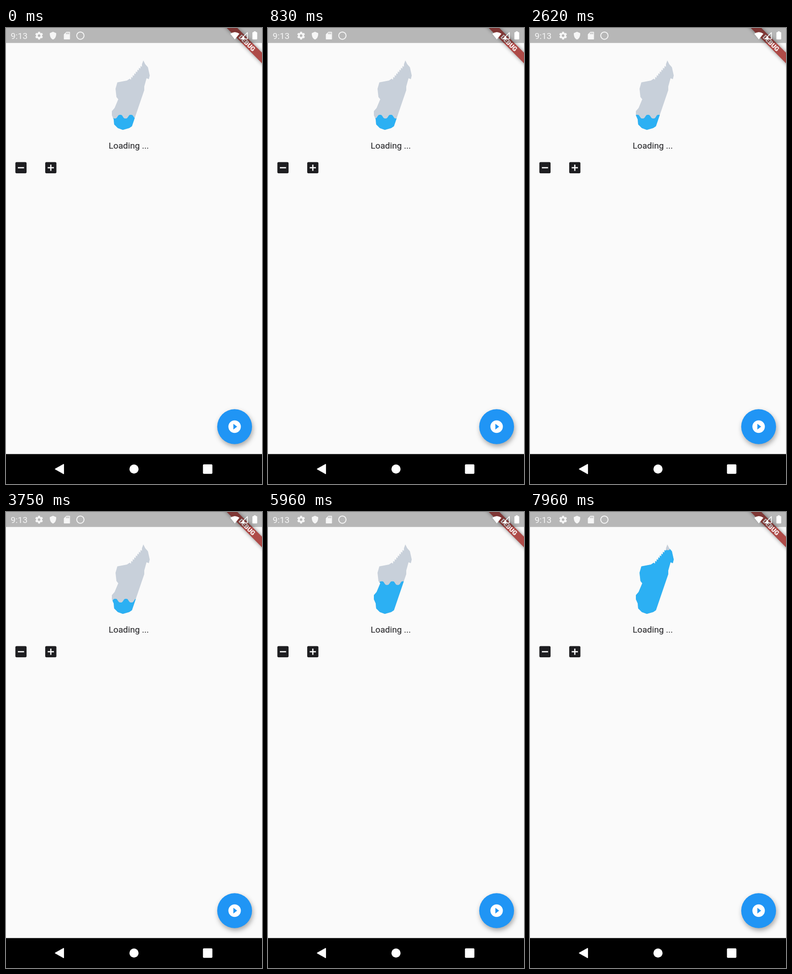
Recreate the animation shown at these times as an HTML page with a canvas. Size 561x998 px, loop 8000 ms.

```html
<!DOCTYPE html>
<html lang="en">
<head>
<meta charset="utf-8">
<title>Liquid loading indicator</title>
<style>
html, body { margin: 0; width: 100%; height: 100%; overflow: hidden; background: #fafafa; }
canvas { display: block; width: 561px; height: 998px; }
</style>
</head>
<body>
<canvas id="stage" width="561" height="998"></canvas>
<script>
const ctx = document.getElementById('stage').getContext('2d');
const W = 561, H = 998, LOOP = 8000, TAU = Math.PI * 2;
const DP = 1.3635;
const PAGE = '#fafafa', INK = '#1e1e21', BAR = '#f6f6f6', WHITE = '#fff';

function rect(x, y, w, h, color, r = 0) {
  ctx.fillStyle = color;
  ctx.beginPath();
  ctx.roundRect(x, y, w, h, r);
  ctx.fill();
}

function disc(x, y, r, color) {
  ctx.fillStyle = color;
  ctx.beginPath();
  ctx.arc(x, y, r, 0, TAU);
  ctx.fill();
}

function poly(points, color, round = 0) {
  ctx.fillStyle = ctx.strokeStyle = color;
  ctx.lineJoin = 'round';
  ctx.lineWidth = round;
  ctx.beginPath();
  points.forEach(([x, y]) => ctx.lineTo(x, y));
  ctx.closePath();
  ctx.fill();
  if (round) ctx.stroke();
}

function text(str, x, y, font, color, align = 'left') {
  ctx.font = font;
  ctx.fillStyle = color;
  ctx.textAlign = align;
  ctx.fillText(str, x, y);
}

function shadow(color, blur, dx = 0, dy = 0) {
  ctx.shadowColor = color;
  ctx.shadowBlur = blur;
  ctx.shadowOffsetX = dx;
  ctx.shadowOffsetY = dy;
}

// Key points of the coast, with a ragged bay shore cut by a loop
function coast() {
  const path = new Path2D('M301 71L305 79 311 86 315 104 313 112 308 110 303 128 303 136 ' +
    '290 174 276 215 270 219 256 223 245 219 237 211 236 200 232 191 232 182 ' +
    '238 175 246 156 242 151 240 133 244 119 265 115');
  for (let i = 0; i < 8; i++) {
    const x = 271 + i * 3.4, y = 111 - i * 4;
    path.lineTo(x, y);
    path.lineTo(x + 3, y + 2);
  }
  path.lineTo(298, 79);
  path.closePath();
  return path;
}
const island = coast();

// The wave runs about one wavelength per second and sways a little
function wavePhase(t) {
  return t / 1000 - .49 + .14 * Math.cos((t - 200) / 5400 * TAU);
}

function waterLevel(t) {
  const p = Math.max(0, (t - 4700) / 3300);
  return 194 - 116 * p ** 1.15;
}

function drawIsland(t) {
  const mid = waterLevel(t), phase = wavePhase(t), wave = [[225, 230]];
  ctx.fillStyle = '#c8d0da';
  ctx.fill(island);
  ctx.save();
  ctx.clip(island);
  for (let x = 225; x <= 320; x++) {
    const c = Math.cos(((x - 235) / 23.5 - phase) * TAU);
    wave.push([x, mid - 4 * c * (1.5 - .5 * c * c)]);
  }
  wave.push([320, 230]);
  poly(wave, '#2cb0f3');
  ctx.restore();
}

function drawStepButton(cx, cy, plus) {
  const side = 18 * DP, bar = 10 * DP, thick = 2 * DP;
  rect(cx - side / 2, cy - side / 2, side, side, INK, 2 * DP);
  rect(cx - bar / 2, cy - thick / 2, bar, thick, PAGE);
  if (plus) rect(cx - thick / 2, cy - bar / 2, thick, bar, PAGE);
}

function drawPlayButton() {
  const x = 501, y = 872.5, blue = '#2095f5';
  ctx.save();
  shadow('rgba(0,0,0,.34)', 11, 2, 5);
  disc(x, y, 28 * DP, blue);
  ctx.restore();
  disc(x, y, 10 * DP, WHITE);
  poly([[x - 2 * DP, y - 4.5 * DP], [x + 4 * DP, y], [x - 2 * DP, y + 4.5 * DP]], blue);
}

function drawBanner() {
  ctx.save();
  ctx.translate(W, 0);
  ctx.rotate(Math.PI / 4);
  ctx.save();
  shadow('rgba(0,0,0,.45)', 8);
  rect(-70, 28 * DP, 140, 12 * DP, '#ae4b48');
  ctx.restore();
  text('DEBUG', 0, 51.4, '900 13.9px Roboto, sans-serif', WHITE, 'center');
  ctx.restore();
}

function drawGear(cx, cy) {
  ctx.save();
  ctx.translate(cx, cy);
  ctx.strokeStyle = BAR;
  ctx.lineWidth = 3.8;
  ctx.beginPath();
  ctx.arc(0, 0, 4.8, 0, TAU);
  ctx.stroke();
  for (let i = 0; i < 6; i++) {
    ctx.rotate(TAU / 6);
    rect(-2.2, -8.5, 4.4, 3.5, BAR, .6);
  }
  ctx.restore();
}

function drawShield(cx, top) {
  ctx.fillStyle = BAR;
  ctx.beginPath();
  ctx.moveTo(cx, top);
  ctx.lineTo(cx + 7, top + 3.1);
  ctx.bezierCurveTo(cx + 7.4, top + 10.5, cx + 4.5, top + 15.6, cx, top + 17);
  ctx.bezierCurveTo(cx - 4.5, top + 15.6, cx - 7.4, top + 10.5, cx - 7, top + 3.1);
  ctx.fill();
}

function drawCard(x, y) {
  poly([[x, y + 5], [x + 5, y], [x + 12.6, y], [x + 12.6, y + 15.6], [x, y + 15.6]], BAR, 1);
  for (let i = 0; i < 3; i++) rect(x + 4.4 + i * 2.6, y + 1.2, 1.5, 3.4, '#b6b6b6');
}

function drawStatus() {
  rect(0, 0, W, 24 * DP, 'rgba(0,0,0,.27)');
  text('9:13', 10.3, 24, '19.1px Roboto, sans-serif', BAR);
  drawGear(72.5, 16.7);
  drawShield(103, 8.2);
  drawCard(127.2, 8.9);
  ctx.strokeStyle = BAR;
  ctx.lineWidth = 2;
  ctx.beginPath();
  ctx.arc(163, 16.7, 8, 0, TAU);
  ctx.stroke();

  ctx.fillStyle = ctx.strokeStyle = WHITE;
  ctx.beginPath();
  ctx.moveTo(501.5, 25);
  ctx.lineTo(491.5, 12.5);
  ctx.quadraticCurveTo(501.5, 5.5, 511.5, 12.5);
  ctx.fill();
  ctx.lineWidth = 1.6;
  ctx.strokeRect(0, 0, 0, 0);
  ctx.beginPath();
  ctx.moveTo(529, 10);
  ctx.lineTo(529, 24);
  ctx.lineTo(515, 24);
  ctx.closePath();
  ctx.stroke();
  poly([[515, 24], [522, 17], [522, 24]], WHITE);
  rect(540, 9, 10.5, 16, WHITE, 1.5);
  rect(543, 7.3, 4.5, 3, WHITE);
}

function drawNav() {
  const top = H - 48 * DP;
  rect(0, top, W, H - top, '#000');
  poly([[108, 965.3], [126.3, 955], [126.3, 975.6]], WHITE, 1.6);
  disc(280.5, 965.3, 10, WHITE);
  rect(431.6, 955, 20.7, 20.7, WHITE, 2);
}

function draw(t) {
  rect(0, 0, W, H, PAGE);
  drawIsland(t);
  text('Loading ...', 225, 263.6, '19.1px Roboto, sans-serif', INK);
  drawStepButton(32.8, 305.8, false);
  drawStepButton(98.2, 305.8, true);
  drawPlayButton();
  drawBanner();
  drawStatus();
  drawNav();
}

const start = performance.now();
function tick(now) {
  draw(Math.max(0, now - start) % LOOP);
  requestAnimationFrame(tick);
}
draw(0);
requestAnimationFrame(tick);
</script>
</body>
</html>
```
